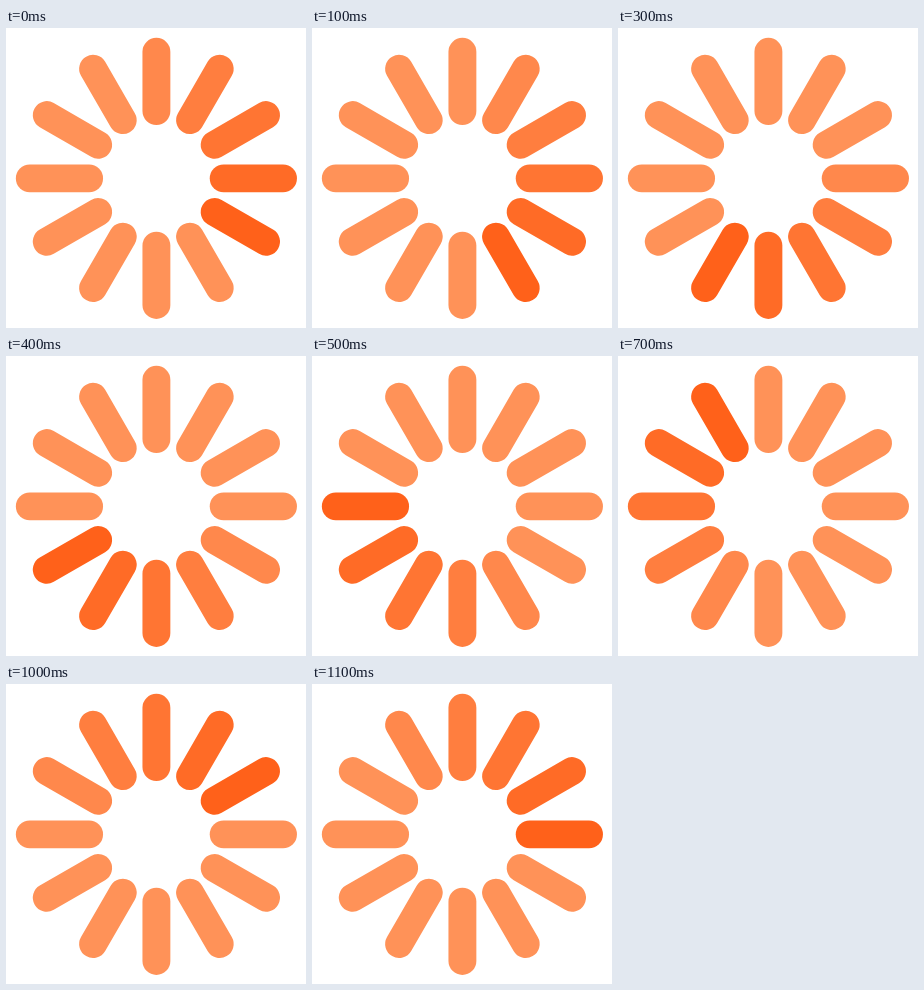
Recreate the animation shown at these times as an HTML page with a canvas. Size 300 by 300 pixels, loop 1200 ms.

```html
<!DOCTYPE html>
<html lang="en">
<head>
<meta charset="utf-8">
<title>Spinner</title>
<style>
  html, body { margin: 0; width: 100%; height: 100%; overflow: hidden; background: #fff; }
  canvas { display: block; width: 300px; height: 300px; }
</style>
</head>
<body>
<canvas id="stage" width="300" height="300"></canvas>
<script>
const ctx = document.getElementById('stage').getContext('2d');
const SPOKES = 12, STEP = 100, TAIL = 5;
const CENTER = 150.4, INNER = 67.3, OUTER = 126.6, WIDTH = 27.9;
const HEAD = [255, 97, 26], REST = [255, 146, 88];

function shade(age) {
  const k = Math.min(age / TAIL, 1);
  return `rgb(${HEAD.map((c, i) => Math.round(c + (REST[i] - c) * k)).join()})`;
}

function draw(time) {
  const head = 1 + Math.floor(time / STEP) % SPOKES;
  ctx.fillStyle = '#fff';
  ctx.fillRect(0, 0, 300, 300);
  ctx.lineCap = 'round';
  ctx.lineWidth = WIDTH;
  for (let i = 0; i < SPOKES; i++) {
    const angle = i * 2 * Math.PI / SPOKES;
    const x = Math.cos(angle), y = Math.sin(angle);
    ctx.strokeStyle = shade((head - i + SPOKES) % SPOKES);
    ctx.beginPath();
    ctx.moveTo(CENTER + x * INNER, CENTER + y * INNER);
    ctx.lineTo(CENTER + x * OUTER, CENTER + y * OUTER);
    ctx.stroke();
  }
}

let start = null;
function tick(now) {
  if (start === null) start = now;
  draw(Math.max(0, now - start));
  requestAnimationFrame(tick);
}
draw(0);
requestAnimationFrame(tick);
</script>
</body>
</html>
```
